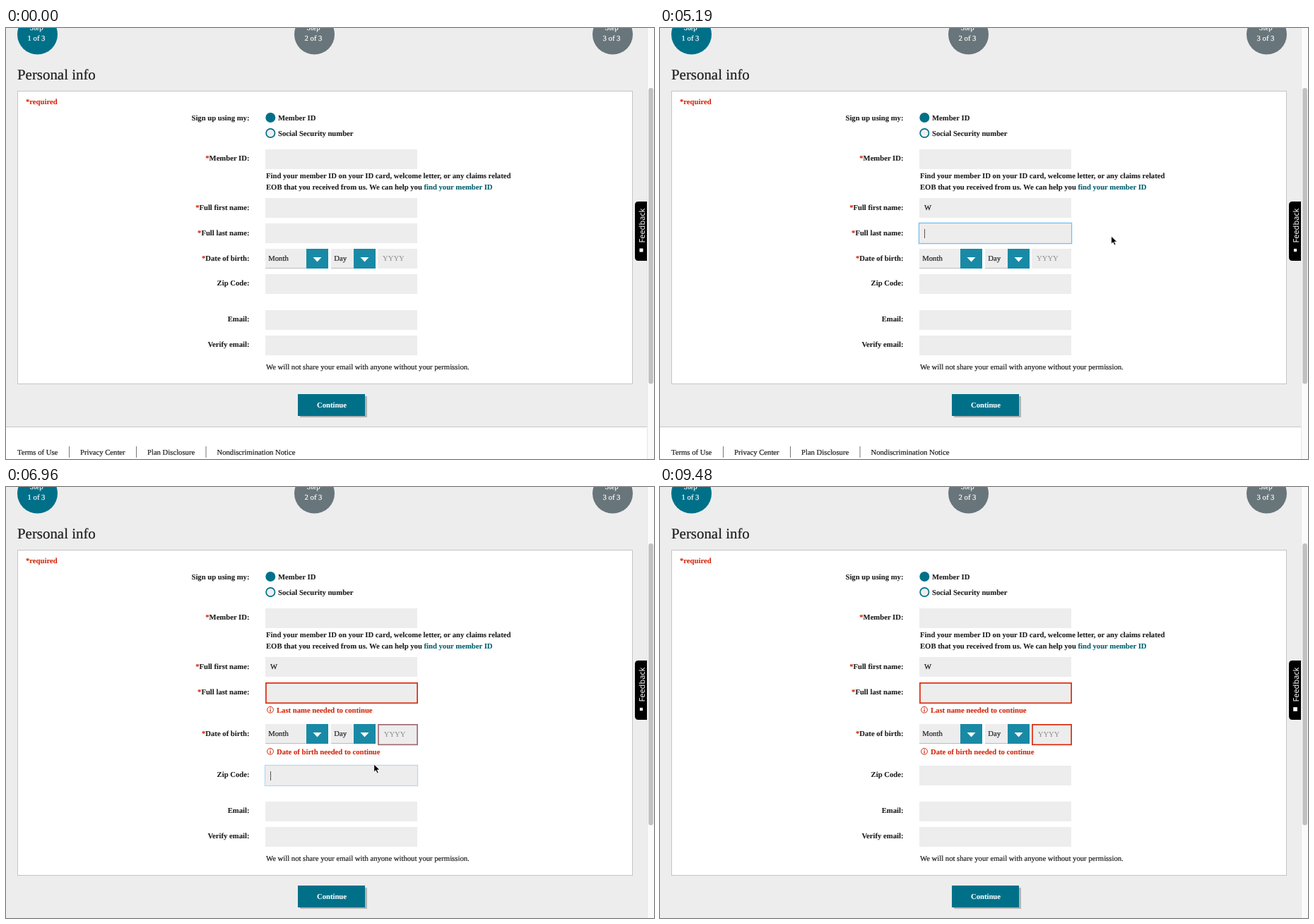
An HTML page that plays this animation: 917 px wide and 611 px high, repeating every 9630 ms.

```html
<!DOCTYPE html>
<html lang="en">
<head>
<meta charset="utf-8">
<title>Sign up form</title>
<style>
html, body { margin: 0; width: 100%; height: 100%; overflow: hidden; background: #ededed; }
svg { display: block; width: 100vw; height: 100vh; }
text { font: 10.66px "Liberation Serif", Times, serif; fill: #1d1d1d; stroke: #1d1d1d; stroke-width: .2; text-rendering: geometricPrecision; white-space: pre; }
.b { font-weight: bold; stroke-width: .08; }
.r { fill: #d2260b; stroke: #d2260b; }
.w { fill: #fff; stroke: #fff; }
.link { fill: #00606f; stroke: #00606f; }
.hint { fill: #8b8b8b; stroke: none; }
.end { text-anchor: end; }
.mid { text-anchor: middle; }
.tip { font: 900 12px Lato, sans-serif; fill: #000; stroke: none; text-anchor: middle; }
.tab { font: 11px "Noto Sans", sans-serif; stroke: none; }
</style>
</head>
<body>
<svg id="stage" viewBox="0 0 917 611"></svg>
<script>
const LOOP = 9630, TEAL = '#007089', GREY = '#ededed';
const FOCUS = [96, 184, 238], ERROR = [220, 44, 14];
const LEFT = 367, WIDE = 215;

// Bursts of picture changes: start, end, number of steps
const BURSTS = [
  [0, 0, 1], [150, 1180, 8], [1330, 1470, 2], [1920, 1920, 1], [2370, 2370, 1],
  [2670, 3710, 8], [3860, 4890, 8], [5040, 6070, 8], [6220, 7260, 8],
  [7410, 8440, 8], [8590, 9480, 7]
];

// Pointer path: time, x, y
const PATH = [
  [150, 500, 541], [1040, 457.5, 262.5], [3100, 457.5, 262.5], [3700, 470, 291], [4150, 470, 291],
  [4600, 655, 301], [5040, 638.5, 295], [5340, 638.5, 295], [5900, 553, 351], [6370, 553, 351],
  [6800, 520.7, 393], [7110, 520.7, 393], [7550, 480, 459], [7750, 480, 459], [8000, 466.3, 491],
  [8590, 466.3, 491], [9330, 472, 606]
];

// Text fields: on/off are focus times, err is the time the error shows
const FIELDS = {
  member: { y: 172 },
  first: { y: 241, on: 1330, off: 4000 },
  last: { y: 277, on: 4000, off: 5325, err: 5325 },
  year: { x: 526, y: 313, w: 56, on: 6060, off: 6950, err: 6950 },
  zip: { y: 349, on: 6950, off: 7700 },
  email: { y: 400, on: 7700, off: 8140 },
  verify: { y: 436, on: 8140, off: 8880 }
};

const el = id => document.getElementById(id);
const set = (id, attrs) => { for (const k in attrs) el(id).setAttribute(k, attrs[k]); };
const show = (id, on) => set(id, { visibility: on ? 'visible' : 'hidden' });
const clamp = v => Math.max(0, Math.min(1, v));

const rect = (x, y, w, h, fill, more = '') =>
  `<rect x="${x}" y="${y}" width="${w}" height="${h}" fill="${fill}" ${more}/>`;
const text = (x, y, s, cls = '', more = '') => `<text x="${x}" y="${y}" class="${cls}" ${more}>${s}</text>`;
const label = (y, s, must) => text(344.5, y, (must ? '<tspan class="r">*</tspan>' : '') + s, 'b end');

const field = id => {
  const { x = LEFT, y, w = WIDE } = FIELDS[id];
  return rect(x, y, w, 28, GREY, `id="${id}"`) +
    rect(x - 1, y - 1, w + 2, 30, 'none', `id="${id}Glow" stroke="#9fd3f5" stroke-width="3" rx="1"`) +
    rect(x - .5, y - .5, w + 1, 29, 'none', `id="${id}Ring"`) +
    rect(374, y + 8, 1, 13, '#555', `id="${id}Caret"`);
};

const select = (x, w, s) =>
  rect(x, 313, w + 31, 28, GREY) + rect(x, 340, w, 1, '#bdbdbd') +
  rect(x + w, 313, 31, 28, '#188aa6') +
  `<path d="M${x + w + 9.5} 325h12l-6 6.5z" fill="#fff"/>` + text(x + 4.3, 330, s);

const step = (x, n, fill) =>
  `<circle cx="${x}" cy="9" r="28.5" fill="${fill}"/>` +
  text(x - 1.5, 3.2, 'Step', 'w mid') + text(x - 1.5, 18.2, n + ' of 3', 'w mid');

const warning = (id, y, s) => `<g id="${id}">
  <circle cx="374" cy="${y - 4.5}" r="4.4" fill="none" stroke="#d2260b"/>
  <path d="M374 ${y - 7.3}v1.3M374 ${y - 5}v3.4" stroke="#d2260b" stroke-width="1.3"/>
  ${text(383, y, s, 'b r')}</g>`;

const footer = [[16, 'Terms of Use'], [105, 'Privacy Center'], [200, 'Plan Disclosure'], [298.5, 'Nondiscrimination Notice']];

el('stage').innerHTML =
  rect(0, 0, 917, 611, GREY) +
  step(44.5, 1, TEAL) + step(436.5, 2, '#68757a') + step(858.5, 3, '#68757a') +
  text(16, 72.5, 'Personal info', '', 'style="font-size:20.9px"') +
  rect(16.5, 89.5, 870, 415, '#fff', 'id="panel" stroke="#c4c4c4"') +
  text(28, 108, '*required', 'b r') +
  label(131, 'Sign up using my:') +
  `<circle cx="374.3" cy="127" r="7" fill="${TEAL}"/>` + text(385, 131, 'Member ID', 'b') +
  `<circle cx="374.3" cy="149" r="6.2" fill="#eee" stroke="${TEAL}" stroke-width="1.7"/>` +
  text(385, 153, 'Social Security number', 'b') +
  label(188, 'Member ID:', 1) + field('member') +
  text(368, 212.5, 'Find your member ID on your ID card, welcome letter, or any claims related', 'b') +
  text(368, 229.3, 'EOB that you received from us. We can help you <tspan class="link">find your member ID</tspan>', 'b') +
  label(258, 'Full first name:', 1) + field('first') + text(374, 258, 'W', '', 'id="typed"') +
  label(294, 'Full last name:', 1) + field('last') +
  warning('lastWarn', 320.3, 'Last name needed to continue') +
  '<g id="lower">' +
    label(330, 'Date of birth:', 1) + select(LEFT, 58, 'Month') + select(460, 32, 'Day') +
    field('year') + text(533, 330, 'YYYY', 'hint', 'id="yearHint"') +
    warning('yearWarn', 356.3, 'Date of birth needed to continue') +
    '<g id="bottom">' +
      label(365.3, 'Zip Code:') + field('zip') +
      label(416.3, 'Email:') + field('email') +
      label(452.3, 'Verify email:') + field('verify') +
      text(368, 484.3, 'We will not share your email with anyone without your permission.') +
      rect(416, 522, 95, 30, '#b4b4b4', 'rx="1"') + rect(413, 519, 95, 31, TEAL) +
      text(461, 538, 'Continue', 'b w mid') +
      rect(0, 566, 907, 46, '#fff') + rect(0, 565, 907, 1, '#c6c6c6') +
      footer.map(([x, s], i) => text(x, 605, s) + (i ? rect(x - 16, 593, 1, 16, '#777') : '')).join('') +
    '</g></g>' +
  `<g id="tip"><rect x="400" y="438.5" width="151" height="36.5" rx="2.5" fill="#fff" stroke="#0f9db8" stroke-width="1.8"/>
    <path d="M473 475h13l-6.5 6.5z" fill="#0f9db8"/>` +
    text(475.3, 452.3, 'Please enter your email', 'tip') + text(475.3, 467.5, 'address', 'tip') + '</g>' +
  rect(907, 0, 10, 611, '#fafafa') + rect(907, 0, 1, 611, '#e6e6e6') +
  rect(909.3, 85, 6.6, 419.5, '#c1c1c1', 'id="thumb" rx="3.3"') +
  '<path d="M907 246h-12q-5 0-5 5v74q0 5 5 5h12z" fill="#000"/>' +
  text(0, 0, 'Feedback', 'w tab', 'transform="translate(904 304.5) rotate(-90)"') +
  rect(896, 312, 6, 6, '#fff', 'id="mark"') +
  `<path id="arrow" d="M0 0v11.2l2.6-2.4 1.9 4.2 2-.9-1.9-4h3.7z" fill="#000" stroke="#fff" stroke-width=".9"/>
   <path id="beam" d="M-2.5-6q2 0 2.5 1q.5-1 2.5-1M0-5v10M-2.5 6q2 0 2.5-1q.5 1 2.5 1M-1.2 2h2.4" fill="none" stroke="#111"/>`;

// Hold each picture until the next step of its burst
function hold(t) {
  const [start, end, n] = BURSTS.filter(b => b[0] <= t).pop();
  if (n === 1) return start;
  const gap = (end - start) / (n - 1);
  return start + gap * Math.min(n - 1, Math.floor((t - start + 6) / gap));
}

function pointer(t) {
  const i = PATH.findIndex(p => p[0] > t);
  if (i < 1) return PATH[i ? PATH.length - 1 : 0].slice(1);
  const [a, b] = [PATH[i - 1], PATH[i]];
  const u = (t - a[0]) / (b[0] - a[0]), e = u * u * (3 - 2 * u);
  return [a[1] + (b[1] - a[1]) * e, a[2] + (b[2] - a[2]) * e];
}

const ramp = (t, from) => t < from ? 0 : clamp((t - from + 150) / 300);
const mix = k => `rgb(${FOCUS.map((c, i) => Math.round(c + (ERROR[i] - c) * k))})`;

function drawField(id, t) {
  const { x = LEFT, y, w = WIDE, on = Infinity, off = Infinity, err = Infinity } = FIELDS[id];
  const bad = ramp(t, err), focus = t < off ? ramp(t, on) : 0;
  const blink = t < on + 450 || Math.floor((t - on - 140) / 450) % 2 === 0;
  set(id, { height: bad ? 30 : 28 });
  set(id + 'Ring', bad
    ? { x: x + .9, y: y + .9, width: w - .8, height: 28.4, stroke: mix(bad), 'stroke-width': 1.7, opacity: 1 }
    : { x: x - .5, y: y - .5, width: w + 1, height: 29, stroke: mix(0), 'stroke-width': 1, opacity: focus * .9 });
  set(id + 'Glow', { opacity: focus * .22 });
  const typed = id === 'first' && t >= 2660;
  set(id + 'Caret', { x: typed ? 385 : id === 'year' ? 533 : 374 });
  show(id + 'Caret', focus && (blink || typed || id !== 'first') && t >= (id === 'first' ? 1465 : 0));
}

function draw(t) {
  const lastBad = t >= FIELDS.last.err, yearBad = t >= FIELDS.year.err;
  const drop = lastBad ? 23 : 0, drop2 = yearBad ? 23 : 0;
  for (const id in FIELDS) drawField(id, t);

  set('lower', { transform: `translate(0 ${drop})` });
  set('bottom', { transform: `translate(0 ${drop2})` });
  set('panel', { height: 415 + drop + drop2 });
  set('yearHint', yearBad ? { x: 534.7, y: 331.3 } : { x: 533, y: 330 });
  set('thumb', yearBad ? { y: 80, height: 399.5 } : lastBad ? { y: 82.5, height: 409 } : { y: 85, height: 419.5 });
  show('lastWarn', lastBad);
  show('yearWarn', yearBad);
  show('typed', t >= 2660);
  show('tip', t >= FIELDS.verify.on && t < FIELDS.verify.off);

  const size = 5 + Math.sin(t / 147 * Math.PI / 2);
  set('mark', { x: 899 - size / 2, y: 315 - size / 2, width: size, height: size });

  const [x, y] = pointer(t);
  const inField = Object.values(FIELDS).some(f => {
    const left = f.x || LEFT;
    const top = f.y + (f.y > 300 ? drop : 0) + (f.y > 340 ? drop2 : 0);
    return x > left && x < left + (f.w || WIDE) && y > top && y < top + 28;
  });
  const seen = t >= 150 && t < 9470 && !(t > 2660 && t < 3100);
  set('arrow', { transform: `translate(${x} ${y})` });
  set('beam', { transform: `translate(${x} ${y})` });
  show('arrow', seen && !inField);
  show('beam', seen && inField);
}

function tick() {
  draw(hold(performance.now() % LOOP));
  requestAnimationFrame(tick);
}
tick();
</script>
</body>
</html>
```
